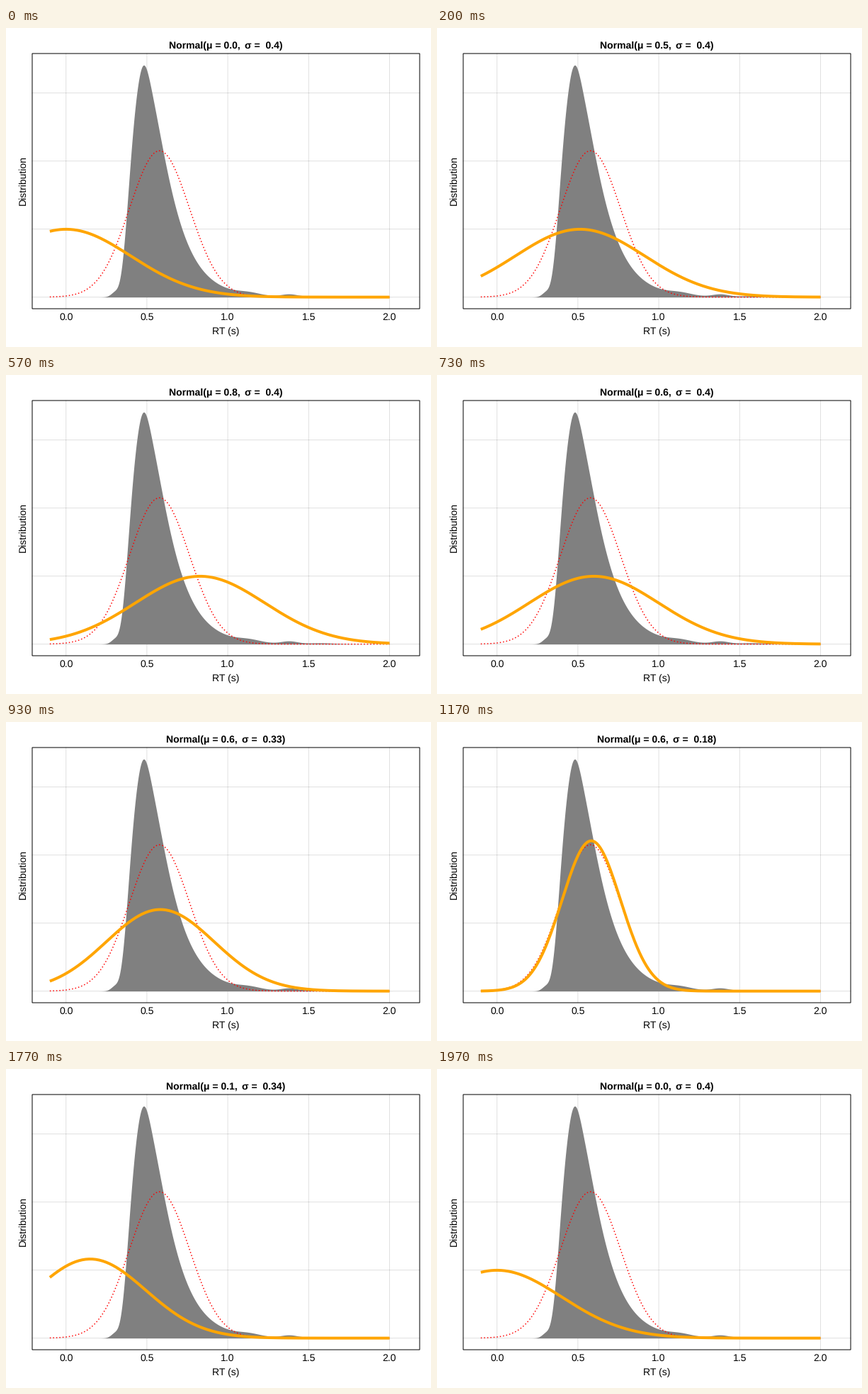
These frames come from a looping animation (600x450 px, 2.01 s). A matplotlib script:

```python
import math

import matplotlib.pyplot as plt
import numpy as np
from matplotlib.animation import FuncAnimation
from matplotlib.patches import Rectangle

W, H, DPI = 600, 450, 100
PT = 72 / DPI                      # points per pixel
STEPS, TICK, LOOP = 60, 10, 2010   # poses, clock tick and loop length in ms

LEFT, RIGHT, TOP, BOTTOM = 37, 584, 36, 396
X0, X_UNIT = 84.7, 228.4           # pixel of x = 0, pixels per second
Y0, Y_UNIT = 379.64, 96.0          # pixel of density 0, pixels per unit

MEAN, SD = 0.58, 0.18

plt.rcParams["font.family"] = "Liberation Sans"
plt.rcParams["font.size"] = 14 * PT
plt.rcParams["text.hinting"] = "none"


def px(x):
    return X0 + X_UNIT * x


def py(y):
    return Y0 - Y_UNIT * y


def bell(x, mid, width, height=1.0):
    return height * np.exp(-0.5 * ((x - mid) / width) ** 2)


def normal(x, mu, sigma):
    return bell(x, mu, sigma, 1 / (sigma * math.sqrt(2 * math.pi)))


def reaction_times(x):
    """Shifted log-normal with a sharper peak and a bumpy tail."""
    log_t = np.log(np.maximum(x - 0.2646, 1e-9))
    y = bell(log_t, math.log(0.2164), 0.48, 3.27)
    y += bell(x, 0.48, 0.03, 0.14) + bell(x, 0.315, 0.03, 0.1)
    y += bell(x, 1.13, 0.07, 0.034) + bell(x, 1.38, 0.05, 0.036)
    return y + bell(x, 1.58, 0.09, 0.015)


def ease(t, span, values):
    """Cosine easing from one value to another, held outside the span."""
    p = min(max((t - span[0]) / (span[1] - span[0]), 0), 1)
    return values[0] + (values[1] - values[0]) * (1 - math.cos(math.pi * p)) / 2


def last_before(t, limit):
    """Time of the current step, or of the last one before the limit."""
    return min(t, (math.ceil(limit * (STEPS - 1)) - 1) / (STEPS - 1))


def params(t):
    if t >= 0.7:
        return ease(t, (0.7, 1), (MEAN, 0)), ease(t, (0.7, 1), (SD, 0.4))
    if t < 0.2:
        mu = ease(t, (0, 0.2), (0, 1))
    else:
        mu = ease(last_before(t, 0.4), (0.2, 0.4), (1, MEAN))
    return mu, ease(last_before(t, 0.6), (0.4, 0.6), (0.4, SD))


fig = plt.figure(figsize=(W / DPI, H / DPI), dpi=DPI, facecolor="white")
ax = fig.add_axes([0, 0, 1, 1])
ax.set(xlim=(0, W), ylim=(H, 0))
ax.axis("off")

# Grid, frame and labels
grid = dict(color="black", alpha=0.12, lw=PT, snap=False, zorder=1)
for v in np.arange(0, 2.1, 0.5):
    ax.plot([px(v)] * 2, [TOP, BOTTOM], **grid)
    ax.text(px(v), 412, f"{v:.1f}", ha="center", va="baseline")
for v in range(4):
    ax.plot([LEFT, RIGHT], [py(v)] * 2, **grid)
ax.add_patch(Rectangle((LEFT, TOP), RIGHT - LEFT, BOTTOM - TOP, fill=False,
                       ec="black", lw=PT, snap=False, zorder=6))
center = (LEFT + RIGHT) / 2
ax.text(center, 432, "RT (s)", ha="center", va="baseline")
ax.text(27.5, (TOP + BOTTOM) / 2 - 1.3, "Distribution", rotation=90,
        rotation_mode="anchor", ha="center", va="baseline")

# Observed data, its normal fit and the moving curve
times = np.linspace(0.15, 2.02, 500)
ax.fill_between(px(times), py(reaction_times(times)), Y0,
                color="#808080", lw=0, zorder=2)
xs = np.linspace(-0.1, 2, 200)
ax.plot(px(xs), py(normal(xs, 0.578, 0.1855)), color="red", lw=1.5 * PT,
        ls=(0, (1, 2)), dash_capstyle="butt", zorder=3)
curve, = ax.plot([], [], color="#FFA500", lw=4 * PT,
                 solid_capstyle="butt", zorder=4)

title = dict(va="baseline", weight="bold")
title_mu = ax.text(0, 29, "", ha="left", **title)
title_sigma = ax.text(0, 29, "", ha="right", **title)


def update(n):
    step = min((n * TICK + 5) * 3 // 100, STEPS - 1)
    mu, sigma = params(step / (STEPS - 1))
    curve.set_data(px(xs), py(normal(xs, mu, sigma)))

    sd = str(round(sigma, 2))
    half = 80.4 + 3.9 * (len(sd) - 3)
    title_mu.set_text(f"Normal(μ = {mu:.1f},")
    title_mu.set_x(center - half)
    title_sigma.set_text(f"σ =  {sd})")
    title_sigma.set_x(center + half)
    return curve, title_mu, title_sigma


anim = FuncAnimation(fig, update, frames=LOOP // TICK, interval=TICK,
                     repeat=True, repeat_delay=0, blit=False)
plt.show()
```
